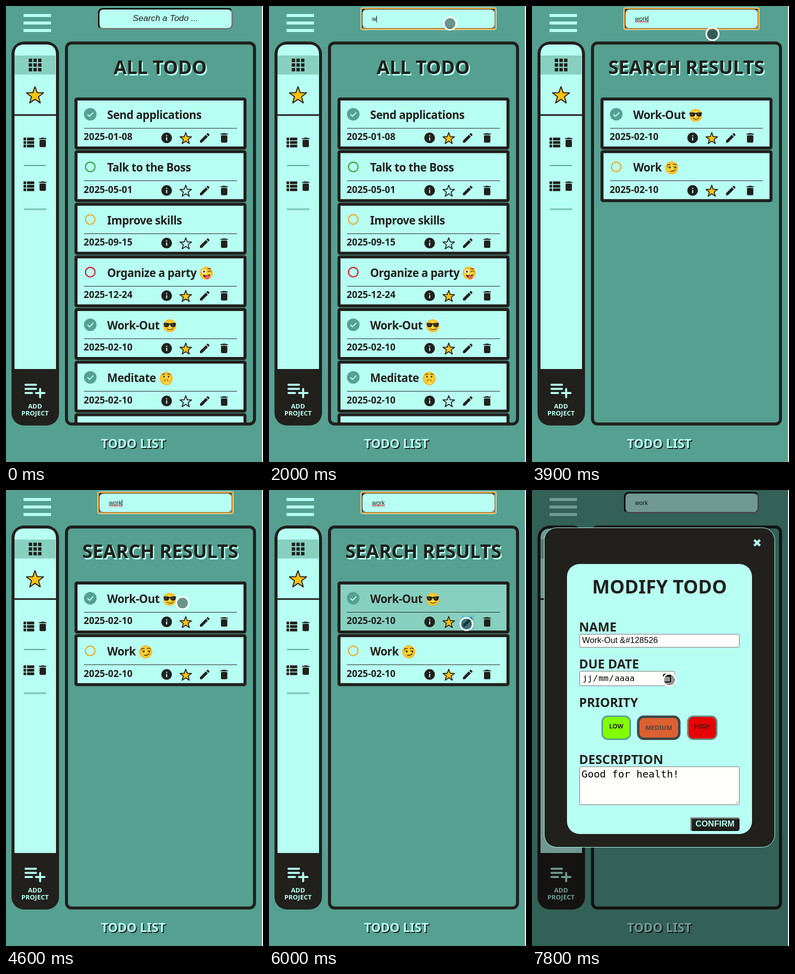
An HTML page for the animation above (8 s loop, 514 by 912 pixels).

```html
<!DOCTYPE html>
<html lang="en">
<head>
<meta charset="utf-8">
<title>Todo list</title>
<style>
html, body { margin: 0; width: 100%; height: 100%; overflow: hidden; background: #fff; }
svg { display: block; width: 514px; height: 912px; }
text { font-family: "Noto Sans", "Open Sans", sans-serif; font-weight: 700; white-space: pre; }
.arial { font-family: "Liberation Sans", Arial, sans-serif; font-weight: 400; }
.mono { font-family: "DejaVu Sans Mono", monospace; font-weight: 400; }
</style>
</head>
<body>
<svg id="stage" viewBox="0 0 514 912" xmlns="http://www.w3.org/2000/svg"></svg>
<script>
const TEAL = '#55a091', LIGHT = '#b8fff3', DARK = '#21201c', ACTIVE = '#87d0c0', GOLD = '#ffc20e';
const LOOP = 8000;

// ---- drawing helpers ----
const rect = (x, y, w, h, fill, rx = 0, more = '') =>
  `<rect x="${x}" y="${y}" width="${w}" height="${h}" rx="${rx}" fill="${fill}" ${more}/>`;
const box = (x, y, w, h, fill, rx, bw, stroke) =>
  rect(x + bw / 2, y + bw / 2, w - bw, h - bw, fill, rx, `stroke="${stroke}" stroke-width="${bw}"`);
const circle = (x, y, r, fill, more = '') => `<circle cx="${x}" cy="${y}" r="${r}" fill="${fill}" ${more}/>`;
const line = (d, stroke, w, more = '') =>
  `<path d="${d}" fill="none" stroke="${stroke}" stroke-width="${w}" ${more}/>`;
const text = (x, y, str, size, fill = DARK, more = '') =>
  `<text x="${x}" y="${y}" font-size="${size}" fill="${fill}" ${more}>${str.replace(/&/g, '&amp;')}</text>`;
const mid = 'text-anchor="middle"';
const group = (id, body, more = '') => `<g id="${id}" ${more}>${body}</g>`;
const at = (x, y, body, s = 1) => `<g transform="translate(${x} ${y}) scale(${s})">${body}</g>`;
const shadowed = (x, y, str, size, fill, shade, d) =>
  text(x + d, y + d, str, size, shade, mid) + text(x, y, str, size, fill, mid);

function star(x, y, r, fill, w) {
  const pts = [];
  for (let i = 0; i < 10; i++) {
    const a = Math.PI * (i / 5 - 0.5), q = i % 2 ? r * 0.41 : r;
    pts.push((x + q * Math.cos(a)).toFixed(2) + ',' + (y + q * Math.sin(a)).toFixed(2));
  }
  return `<polygon points="${pts.join(' ')}" fill="${fill}" stroke="${DARK}" stroke-width="${w}" stroke-linejoin="round"/>`;
}

const icon = (x, y, d) => at(x, y, `<path transform="translate(-12 -12)" d="${d}" fill="${DARK}"/>`, 1.06);
const trash = (x, y) => icon(x, y, 'M6 19c0 1.1.9 2 2 2h8c1.1 0 2-.9 2-2V9c0-1.1-.9-2-2-2H8c-1.1 0-2 .9-2 2zM19 4h-3.5l-1-1h-5l-1 1H5v2h14z');
const pencil = (x, y) => icon(x, y, 'M3 17.25V21h3.75L17.81 9.94l-3.75-3.75zM20.71 7.04a1 1 0 0 0 0-1.41l-2.34-2.34a1 1 0 0 0-1.41 0l-1.83 1.83 3.75 3.75z');
const info = (x, y) => circle(x, y, 10.6, DARK) + rect(x - 1.1, y - 5.3, 2.2, 2.2, LIGHT) + rect(x - 1.1, y - 1.1, 2.2, 6.4, LIGHT);

// ---- emoji, 26 px wide around the origin ----
const INK = '#422b0d';
const eye = (x, y) => `<ellipse cx="${x}" cy="${y}" rx="1.5" ry="2.1" fill="${INK}"/>`;
const curve = (d, w = 1.3) => line(d, INK, w, 'stroke-linecap="round"');
const faces = {
  shades:
    `<path d="M-12.5-5.5Q-6-6.5 0-4.5Q6-6.5 12.5-5.5L12-3Q11.5 3 6.5 3Q2 3 1-2.2H-1Q-2 3-6.5 3Q-11.5 3-12-3Z" fill="#24211f"/>` +
    line('M-9.5-3.5L-6-.5M4-3.5L7.5-.5', '#77716c', 1.4) + curve('M-5 6Q1 10 6.5 5.5'),
  tongue:
    circle(-5, -3, 4.2, '#fff') + circle(-4.6, -3, 2, INK) + curve('M3-2.5Q6-6 9.5-2.8M2.5-8Q6-10 9-8') +
    `<path d="M-7 3Q0 6 8 2Q7 9 0 9.5Q-5.500 9-7 3Z" fill="${INK}"/>` +
    `<path d="M-2 6Q3 3.500 5.500 5.500L6 9.500Q4.500 13 1 12Q-2 11-2 6Z" fill="#f0527c"/>`,
  hush:
    eye(-4.5, -3.5) + eye(4.5, -3.5) + curve('M-8-7.500Q-5-10-2.500-8M2.500-8Q5-10 8-7.500M-4 4Q0 2 4 4') +
    `<path d="M-1.500 0Q.5-1.500 1.800.3L2 6Q7 6 8 9Q7 13 1 13Q-5 13-6 9Q-5 6-1.500 6Z" fill="#ffd94a" stroke="#d98a12" stroke-width=".9"/>`,
  smirk:
    curve('M-9-5Q-6-8-2.500-6M2.500-6Q6-9 9-6', 1.4) + curve('M-8.500-2H-2.500M3-2H9', 1.2) +
    eye(-4, -.5) + eye(7, -.5) + curve('M-3 6.500Q3 8 7 3.500', 1.5)
};
const emoji = (x, y, name) => at(x, y, circle(0, 0, 13, 'url(#skin)') + faces[name]);

// ---- todo cards ----
const RING = { green: '#22a02c', orange: '#f0a51a', red: '#e2000f' };
const status = (y, s) => s === 'done'
  ? circle(168.5, y, 12.6, TEAL) + line(`M163 ${y + .3}l4 4 7.500-7.800`, LIGHT, 2.2)
  : circle(168.5, y, 9.6, 'none', `stroke="${DARK}" stroke-width="1.4" stroke-opacity=".45"`) +
    circle(168.5, y, 9.6, 'none', `stroke="${RING[s]}" stroke-width="2"`);

function card(i, [name, date, state, fav, face, faceX], id = '') {
  const y = 183 + i * 105.25;
  return rect(137, y, 344, 104, DARK, 5) +
    rect(143, y + 6, 332, 92, LIGHT, 0, id && `id="${id}"`) +
    status(y + 33.5, state) +
    text(202.3, y + 43, name, 22.4, DARK, 'letter-spacing="-.5"') +
    (face ? emoji(faceX, y + 35.5, face) : '') +
    rect(156, Math.round(y + 61), 306, 1, DARK) +
    text(155.3, y + 85.3, date, 18.7) +
    info(321.3, y + 80.7) + star(359.5, y + 82.3, 12.2, fav ? GOLD : LIGHT, 1.8) +
    pencil(397.5, y + 80.7) + trash(436.3, y + 80.7);
}
const workOut = ['Work-Out', '2025-02-10', 'done', 1, 'shades', 327.5];
const all = [
  ['Send applications', '2025-01-08', 'done', 1],
  ['Talk to the Boss', '2025-05-01', 'green', 0],
  ['Improve skills', '2025-09-15', 'orange', 0],
  ['Organize a party', '2025-12-24', 'red', 1, 'tongue', 400.5],
  workOut,
  ['Meditate', '2025-02-10', 'done', 0, 'hush', 320.5],
  ['Work', '2025-02-10', 'orange', 1, 'smirk', 279.5]
];
const heading = str => shadowed(308.5, 136, str, 37.5, DARK, LIGHT, 2.5);

// ---- page parts ----
function sidebar() {
  let s = rect(11, 71, 95, 768, DARK, 25) +
    `<path d="M17 726V97Q17 77 37 77H80Q100 77 100 97V726Z" fill="${LIGHT}"/>` +
    rect(17, 99, 82, 38, ACTIVE);
  for (let i = 0; i < 9; i++) s += rect(45.5 + i % 3 * 9.3, 105.3 + Math.floor(i / 3) * 9.3, 6.8, 6.8, DARK);
  s += star(58, 179.3, 18, GOLD, 2) + rect(17, 216.500, 83, 3.2, DARK);
  for (const y of [273, 360.5]) {
    for (let k = -1; k < 2; k++)
      s += rect(35, y + k * 7 - 2.7, 5.4, 5.4, DARK, .6) + rect(42, y + k * 7 - 2.7, 14.5, 5.4, DARK, .6);
    s += trash(73.5, y - .3);
  }
  s += rect(36, 318, 44, 2, TEAL) + box(36, 405, 44, 3, LIGHT, 0, 1, TEAL);
  return s + line('M39 757.500H60M39 765.700H60M39 774H52M60 774H77M68.300 766V782.500', LIGHT, 4, 'stroke-linecap="round"') +
    text(58, 804.5, 'ADD', 13, LIGHT, mid) + text(58, 818.5, 'PROJECT', 13, LIGHT, mid);
}

const search = () =>
  box(184, 4, 270, 43, LIGHT, 9, 3, '#767676') +
  line('M187 43Q185.500 41 185.500 37V14.500Q185.500 5.500 194.500 5.500H443.500Q448 5.500 450.500 8', '#141512', 3) +
  group('focus',
    rect(185, 5, 268, 41, 'none', 3, 'stroke="#dc9a2c" stroke-width="2.400"') +
    rect(183.4, 3.4, 271.2, 44.2, 'none', 3, 'stroke="#fff3d8" stroke-width="1"')) +
  text(319, 30.3, 'Search a Todo ...', 17.3, DARK, mid + ' id="hint" class="arial" font-style="italic"') +
  text(206, 30.3, '', 12.1, DARK, 'id="query" class="arial"') +
  line('M206 31.500' + 'q1.050-2 2.100 0t2.100 0'.repeat(6), '#e0202c', 1.2, 'id="squiggle"') +
  rect(206, 19.5, 1, 13.5, '#000', 0, 'id="caret"');

const field = (y, w, h) => box(95, y, w, h, '#fffffb', 2, 1, '#6f7472');
const pill = (x, w, fill, bw, stroke, name, ink, y) =>
  box(x, 451, w, 49, fill, 11, bw, stroke) + text(x + w / 2, y, name, 12.4, ink, mid);

function modal() {
  const size = 16.65, mono = 'class="mono"';
  return rect(0, 0, 512, 912, '#000', 0, 'opacity=".4"') +
    rect(24.5, 75.5, 461, 639, DARK, 25, `stroke="${LIGHT}"`) +
    line('M444.500 99.800L456 111.300M456 99.800L444.500 111.300', LIGHT, 4.6) +
    rect(70, 148, 370, 540, LIGHT, 25) +
    text(255, 207, 'MODIFY TODO', 37.5, DARK, mid) +
    [['NAME', 283], ['DUE DATE', 357], ['PRIORITY', 434], ['DESCRIPTION', 548]]
      .map(([s, y]) => text(94, y, s, 25)).join('') +
    field(288, 320, 27) + text(100.3, 306.3, 'Work-Out &#128526', size, '#000', 'class="arial"') +
    field(362, 191, 30) +
    [['jj', 101], ['/', 122], ['mm', 133], ['/', 154], ['aaaa', 165.2]]
      .map(([s, x]) => text(x, 382.3, s, size, '#000', mono)).join('') +
    rect(263, 369.5, 14, 14.5, 'none', 1, 'stroke="#111" stroke-width="2"') +
    rect(262, 368.5, 16, 5, '#111') + rect(265, 367, 2, 3, '#111') + rect(273, 367, 2, 3, '#111') +
    pill(139, 59, '#82ff02', 3, '#559f91', 'LOW', DARK, 477.3) +
    pill(210, 87, '#dd6031', 5, '#3d4a48', 'MEDIUM', '#574640', 480.3) +
    pill(310, 61, '#e50406', 3, '#6b8f88', 'HIGH', '#5a0c0a', 477.3) +
    field(553, 320, 77) + text(99, 575, 'Good for health!', 20.25, '#000', mono) +
    line('M407.500 627.500l5-5M411 627.500l1.500-1.500', '#777', 1) +
    box(317, 655, 98, 27, DARK, 3, 3, '#161714') +
    line('M318.500 681V656.500H414', '#6c716e', 3) +
    text(366, 673.4, 'CONFIRM', 16.7, LIGHT, mid + ' class="arial" style="font-weight:700"');
}

const stage = document.getElementById('stage');
stage.innerHTML =
  `<defs><radialGradient id="skin"><stop offset=".5" stop-color="#fdd835"/><stop offset="1" stop-color="#f6b52c"/></radialGradient>` +
  `<clipPath id="inner">${rect(124, 77, 370, 756, '#000', 5)}</clipPath></defs>` +
  rect(0, 0, 512, 912, TEAL) +
  [16, 31, 46].map(y => rect(35, y, 55, 6, LIGHT)).join('') +
  search() + sidebar() +
  box(118, 71, 382, 768, TEAL, 10, 6, DARK) +
  group('all', heading('ALL TODO') + all.map((c, i) => card(i, c)).join(''), 'clip-path="url(#inner)"') +
  group('found', heading('SEARCH RESULTS') + card(0, workOut, 'picked') + card(1, all[6])) +
  shadowed(254.5, 883.5, 'TODO LIST', 24.7, LIGHT, DARK, 2) +
  group('modal', modal()) +
  rect(385, 251, 25, 29, '#33b5e5', 0, 'id="tap"') +
  group('pointer', circle(0, 0, 11, '#000', 'fill-opacity=".42"') +
    circle(0, 0, 12.4, 'none', 'stroke="#fff" stroke-width="3.200"'));

const $ = id => document.getElementById(id);
const show = (id, on) => $(id).setAttribute('display', on ? 'inline' : 'none');

// ---- motion ----
// time, x, y
const path = [
  [400, 216, 8], [500, 270, 20], [700, 362, 35], [3700, 362, 35], [3900, 361, 56],
  [4100, 353, 145], [4200, 353, 145], [4600, 353, 226], [4700, 353, 226],
  [5100, 395, 268], [7000, 395, 268], [7200, 361, 333], [7300, 361, 333], [7800, 275, 380]
];
function pointerAt(t) {
  const i = path.findIndex(p => p[0] > t);
  if (i < 0) return path[path.length - 1].slice(1);
  const a = path[Math.max(i - 1, 0)], b = path[i];
  const u = Math.max(0, (t - a[0]) / (b[0] - a[0])), k = u * u * (3 - 2 * u);
  return [a[1] + (b[1] - a[1]) * k, a[2] + (b[2] - a[2]) * k];
}
const typedAt = t => 'work'.slice(0, [2000, 2200, 2400, 2500].filter(s => t >= s).length);
const caretAt = t => t < 2500 ? t < 1400 || t >= 2000 : Math.floor((t - 2500) / 500) % 2 === 0;

function render(t) {
  const open = t >= 6100, focused = t >= 1000 && !open, pressed = t >= 5900 && !open;
  const typed = typedAt(t), query = $('query');
  query.textContent = typed;
  show('hint', !typed);
  show('focus', focused);
  show('caret', focused && caretAt(t));
  $('caret').setAttribute('x', 206 + (typed ? query.getComputedTextLength() : 0));
  show('squiggle', t >= 3800 && !open);
  show('all', t < 2200);
  show('found', t >= 2200);
  $('picked').setAttribute('fill', pressed ? ACTIVE : LIGHT);
  show('modal', open);
  show('tap', t >= 5900 && t < 6500);
  $('tap').setAttribute('opacity', pressed ? 0.4 : 0.15);
  show('pointer', t >= 400);
  $('pointer').setAttribute('transform', `translate(${pointerAt(t).join(' ')})`);
}

// The screen refreshes ten times a second.
const start = performance.now();
function tick() {
  const t = (performance.now() - start) % LOOP;
  render(Math.floor(t / 100) * 100);
  requestAnimationFrame(tick);
}
tick();
</script>
</body>
</html>
```
